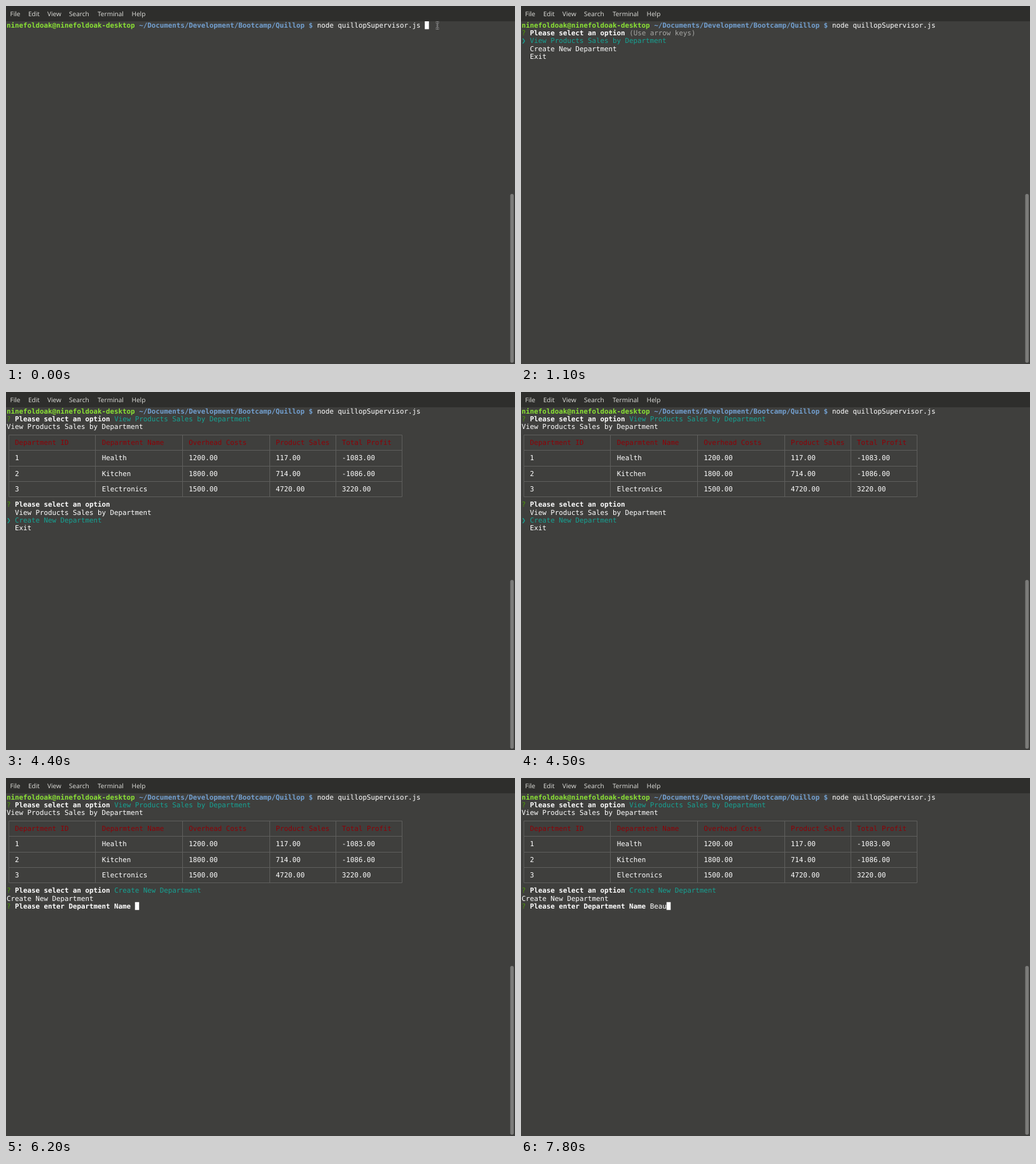
Animation of 800x562 px, one loop 8000 ms. Source, as an HTML page:

```html
<!DOCTYPE html>
<html lang="en">
<head>
<meta charset="utf-8">
<title>Terminal session</title>
<style>
  html, body { margin: 0; width: 100%; height: 100%; overflow: hidden; background: #3f3f3d; }
  svg { display: block; width: 800px; height: 562px; }
  text { white-space: pre; text-rendering: geometricPrecision; }
  .menu text { font: 10px "Noto Sans", sans-serif; fill: #d6d6d2; }
  #screen text { font: 10.808px "DejaVu Sans Mono", monospace; fill: #fff; }
  #screen .bold { font-weight: bold; }
  #screen .user { font-weight: bold; fill: #8ae234; }
  #screen .path { font-weight: bold; fill: #729fcf; }
  #screen .mark { fill: #4e9a06; }
  #screen .pick { fill: #16a394; }
  #screen .hint { fill: #a6a6a4; }
  #screen .head { fill: #8e0007; }
  .grid { fill: none; stroke: #5e5e5c; }
  .block { fill: #fff; }
</style>
</head>
<body>
<svg viewBox="0 0 800 562">
  <rect width="800" height="562" fill="#3f3f3d"/>
  <rect width="800" height="24" fill="#2e2e2c"/>
  <g class="menu">
    <text x="6.5" y="15.8">File</text>
    <text x="35" y="15.8">Edit</text>
    <text x="65" y="15.8">View</text>
    <text x="99" y="15.8">Search</text>
    <text x="144" y="15.8">Terminal</text>
    <text x="197.5" y="15.8">Help</text>
  </g>
  <rect x="792.5" y="295" width="5.5" height="265" rx="2.7" fill="#7b7b79"/>
  <g id="screen"></g>
</svg>
<script>
const LOOP = 8000, CELL_W = 6.507, CELL_H = 12.2, LEFT = 1, TOP = 24;
const OPTIONS = ['View Products Sales by Department', 'Create New Department', 'Exit'];
const COLUMNS = [0, 21, 42, 63, 79, 95];
const TABLE = [
  ['Department ID', 'Deparmtent Name', 'Overhead Costs', 'Product Sales', 'Total Profit'],
  ['1', 'Health', '1200.00', '117.00', '-1083.00'],
  ['2', 'Kitchen', '1800.00', '714.00', '-1086.00'],
  ['3', 'Electronics', '1500.00', '4720.00', '3220.00'],
];
const COMMAND = 'node quillopSupervisor.js';

const colX = col => LEFT + col * CELL_W;
const put = (col, row, text, cls = '') =>
  `<text x="${colX(col)}" y="${TOP + row * CELL_H + 9.9}" class="${cls}">${text}</text>`;
const block = (col, row) =>
  `<rect class="block" x="${colX(col)}" y="${TOP + row * CELL_H}" width="${CELL_W}" height="12.4"/>`;

const shell = command =>
  put(0, 0, 'ninefoldoak@ninefoldoak-desktop', 'user') +
  put(32, 0, '~/Documents/Development/Bootcamp/Quillop $', 'path') +
  put(75, 0, command);

const pointer = () => {
  const shape = 'M675.5 25.5H677.3L678 26.2L678.7 25.5H680.5M678 26V35M675.5 35.5H677.3L678 34.8L678.7 35.5H680.5';
  return `<path d="${shape}" fill="none" stroke="#d0d0d0" stroke-width="2.2"/>` +
    `<path d="${shape}" fill="none" stroke="#111"/>`;
};

const question = (row, text) => put(0, row, '?', 'mark') + put(2, row, text, 'bold');
const ask = row => question(row, 'Please select an option');
const answer = (row, choice) => ask(row) + put(26, row, OPTIONS[choice], 'pick') + put(0, row + 1, OPTIONS[choice]);

const menu = (row, choice, hint) => ask(row) +
  (hint ? put(26, row, '(Use arrow keys)', 'hint') : '') +
  OPTIONS.map((name, i) => put(2, row + 1 + i, name, i === choice ? 'pick' : '')).join('') +
  put(0, row + 1 + choice, '❯', 'pick');

const table = row => {
  const xs = COLUMNS.map(c => Math.floor(colX(c + 0.5)) + 0.5);
  const ys = [0, 1, 2, 3, 4].map(i => Math.floor(TOP + row * CELL_H + 6.7 + i * 24.35) + 0.5);
  const lines = xs.map(x => `M${x} ${ys[0]}V${ys[4]}`).join('') +
    ys.map(y => `M${xs[0]} ${y}H${xs[5]}`).join('');
  const cells = TABLE.map((line, r) => line.map((text, c) =>
    put(COLUMNS[c] + 2, row + 1 + 2 * r, text, r ? '' : 'head')).join('')).join('');
  return `<path class="grid" d="${lines}"/>` + cells;
};

const typing = (command, end) => shell(command) + block(75 + end, 0) + pointer();
const report = () => shell(COMMAND) + answer(1, 0) + table(3);
const naming = (typed, cursor = true) => report() + answer(12, 1) +
  question(14, 'Please enter Department Name') + put(31, 14, typed) +
  (cursor ? block(31 + typed.length, 14) : '');

const STEPS = [
  [0, () => typing(COMMAND, 26)],
  [100, () => typing(COMMAND.replace('i', ''), 25)],
  [200, () => typing(COMMAND, 26)],
  [700, () => shell(COMMAND) + block(0, 1)],
  [1100, () => shell(COMMAND) + menu(1, 0, true)],
  [2500, () => report() + menu(12, 0, true)],
  [4400, () => report() + menu(12, 1, false)],
  [5300, () => naming('')],
  [5900, () => naming('', false)],
  [6200, () => naming('')],
  [6500, () => naming('B')],
  [6700, () => naming('Be')],
  [7200, () => naming('Beu')],
  [7300, () => naming('Be')],
  [7400, () => naming('Bea')],
  [7800, () => naming('Beau')],
];

const screenEl = document.getElementById('screen');
const start = performance.now();
let shown = -1;

function draw(now) {
  const t = Math.max(0, now - start) % LOOP;
  const step = STEPS.findLastIndex(([at]) => at <= t);
  if (step !== shown) {
    shown = step;
    screenEl.innerHTML = STEPS[step][1]();
  }
  requestAnimationFrame(draw);
}
draw(start);
</script>
</body>
</html>
```
